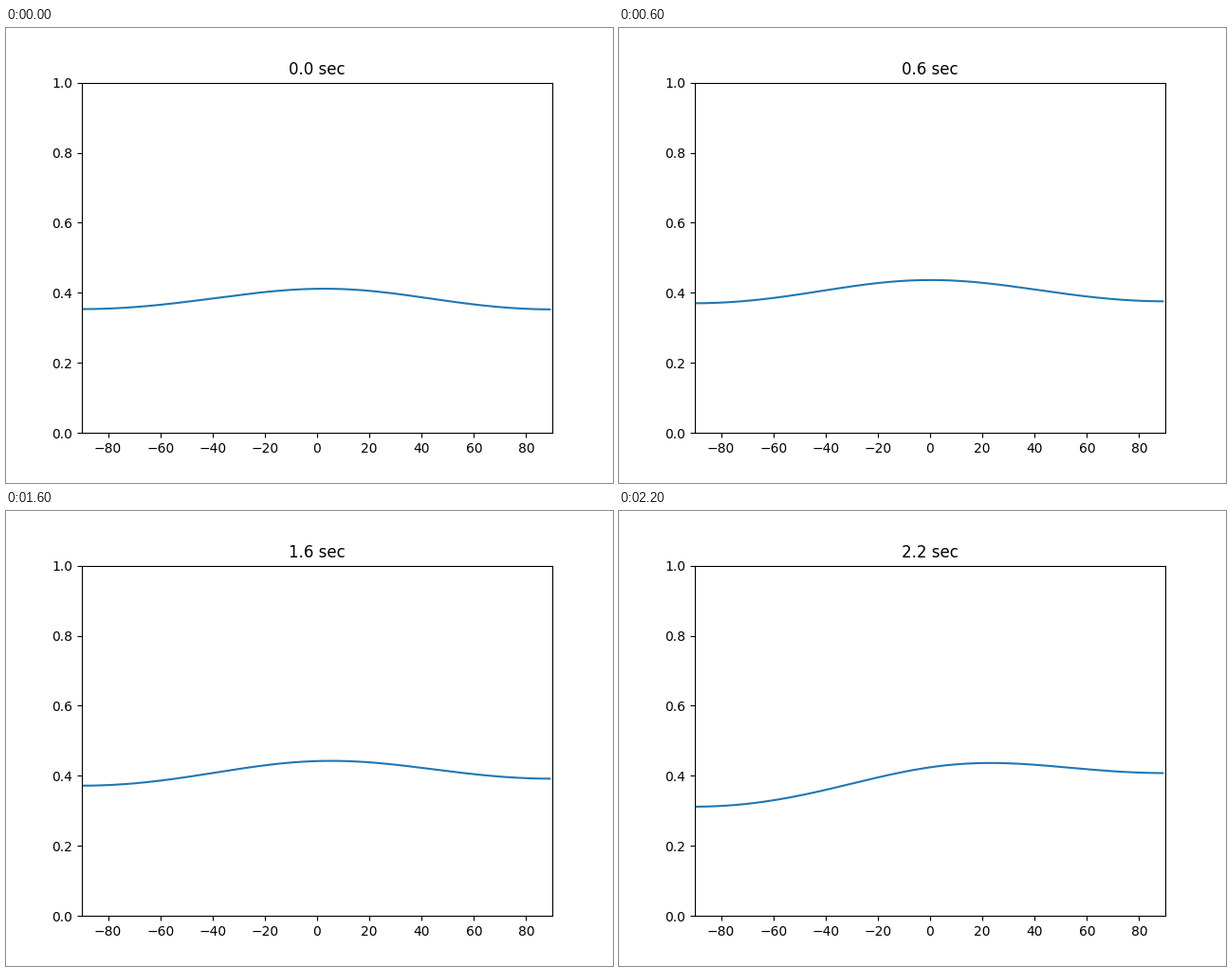
A matplotlib script for the animation above (2.4 s loop, 640 px wide and 480 px high).

```python
import numpy as np
import matplotlib.pyplot as plt
from matplotlib.animation import FuncAnimation

STEP = 0.2     # seconds per frame
FRAMES = 12
K = 1.2        # phase across the array at 90 degrees

# Key points (seconds, level); values run straight between them
LEFT = [(0, 0.3535), (0.6, 0.3703), (1, 0.3993), (1.8, 0.3627),
        (2, 0.3482), (2.2, 0.3119)]
MID = [(0, 0.4115), (0.6, 0.4365), (1, 0.4399), (1.4, 0.4523),
       (1.8, 0.4319), (2.2, 0.4243)]
RIGHT = [(0, 0.3527), (0.2, 0.3801), (1, 0.3713), (1.4, 0.3977),
         (1.8, 0.3858), (2.2, 0.4078)]
SKEW = [(0, 0.0022), (1, -0.003), (1.6, 0)]

angles = np.arange(-90, 90)
u = np.sin(np.radians(angles))


def at(track, t):
    return np.interp(t, *zip(*track))


def response(t):
    """Beam pattern over the sine of the arrival angle."""
    left, mid, right = (at(track, t) for track in (LEFT, MID, RIGHT))
    tilt = (right - left) / 2 * np.sin(K * u) / np.sin(K)
    drop = (mid - (left + right) / 2) * (1 - np.cos(K * u)) / (1 - np.cos(K))
    return mid + tilt - drop + at(SKEW, t) * np.sin(np.pi * u)


plt.rcParams["font.family"] = "DejaVu Sans"
fig, ax = plt.subplots(figsize=(6.4, 4.8), dpi=100)
ax.set_xlim(-90, 90)
ax.set_ylim(0, 1)
line, = ax.plot(angles, response(0), color="#1f77b4", lw=1.5)
title = ax.set_title("0.0 sec")


def update(i):
    t = i * STEP
    line.set_ydata(response(t))
    title.set_text(f"{t:.1f} sec")
    return line, title


anim = FuncAnimation(fig, update, frames=FRAMES, interval=1000 * STEP,
                     repeat=True, repeat_delay=0, blit=False)
plt.show()
```
